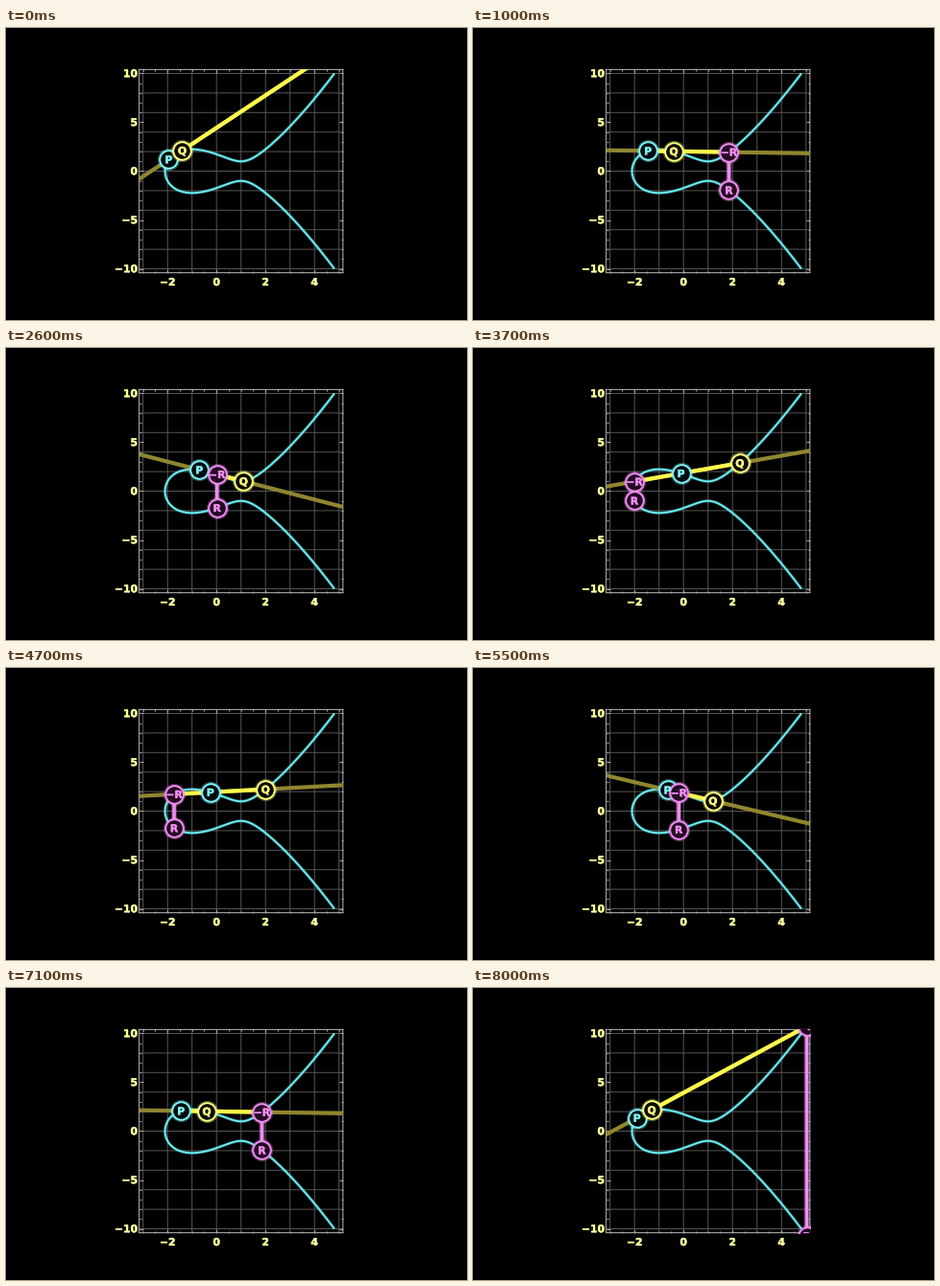
These frames come from a looping animation (480 px wide and 305 px high, 8.1 s). A matplotlib script:

```python
import numpy as np
import matplotlib.pyplot as plt
from matplotlib.animation import FuncAnimation
from matplotlib.patheffects import withStroke
from matplotlib.ticker import MultipleLocator

WIDTH, HEIGHT, DPI = 480, 305, 100
FRAMES, INTERVAL = 81, 100
PX = 72 / DPI                      # one pixel in points
UNIT_X, UNIT_Y = 25.5, 10.2        # pixels per data unit
LEFT, TOP, SIDE = 138.6, 43.4, 212.2

CYAN, YELLOW, PINK = "#6aeef3", "#fffa4c", "#ee8cee"
PALE_CYAN, PALE_YELLOW = "#7df3f7", "#ffff80"
OLIVE, LABEL, GRID, FRAME = "#8f8630", "#ffff9c", "#565656", "#a8a8a8"

plt.rcParams["path.snap"] = False
fig = plt.figure(figsize=(WIDTH / DPI, HEIGHT / DPI), dpi=DPI, facecolor="black")
ax = fig.add_axes([LEFT / WIDTH, 1 - (TOP + SIDE) / HEIGHT,
                   SIDE / WIDTH, SIDE / HEIGHT], facecolor="black")
ax.set_xlim(1 - 4.16, 1 + 4.16)
ax.set_ylim(-10.4, 10.4)


def height(x):
    """Upper branch of y^2 = x^3 - 3x + 3."""
    return np.sqrt(np.maximum(x**3 - 3 * x + 3, 0))


def heavy_text(color, size):
    return dict(color=color, family="DejaVu Sans", weight="bold",
                size=size * PX, va="baseline",
                path_effects=[withStroke(linewidth=0.4 * PX, foreground=color)])


def draw_frame():
    for x in range(-3, 6):
        ax.axvline(x, color=GRID, lw=PX, zorder=1)
    for y in range(-10, 11, 2):
        ax.axhline(y, color=GRID, lw=PX, zorder=1)
    for axis, major, minor in ((ax.xaxis, 2, 0.5), (ax.yaxis, 5, 1)):
        axis.set_major_locator(MultipleLocator(major))
        axis.set_minor_locator(MultipleLocator(minor))
    for which, length in (("major", 4), ("minor", 2.4)):
        ax.tick_params(which=which, direction="in", length=length * PX,
                       width=PX, color=FRAME, top=True, right=True,
                       labelbottom=False, labelleft=False)
    for spine in ax.spines.values():
        spine.set(color=FRAME, lw=1.1 * PX)

    style = heavy_text(LABEL, 10.8)

    def label(value, x, y, ha):
        text = str(value).replace("-", "\u2212")
        fig.text(x / WIDTH, 1 - y / HEIGHT, text, ha=ha, **style)

    for x in (-2, 0, 2, 4):
        label(x, LEFT + (x + 3.16) * UNIT_X, 269, "center")
    for y in (-10, -5, 0, 5, 10):
        label(y, 137, 153.2 - y * UNIT_Y, "right")


def stroke(color, width, z, glow=0):
    """A line with an optional soft halo, returned as a list of artists."""
    lines = [ax.plot([], [], color=color, lw=width * PX, zorder=z,
                     solid_capstyle="butt")[0]]
    if glow:
        lines += ax.plot([], [], color=color, lw=(width + glow) * PX, alpha=0.3,
                         zorder=z - 0.1, solid_capstyle="butt")
    return lines


def place(lines, xs, ys):
    for line in lines:
        line.set_data(xs, ys)


class Badge:
    def __init__(self, text, color, fill, z):
        halo = ax.plot([], [], "o", ms=19 * PX, mfc="none", mec=color,
                       mew=4.4 * PX, alpha=0.3, zorder=z)[0]
        ring = ax.plot([], [], "o", ms=18.6 * PX, mfc=fill, mec=color,
                       mew=2 * PX, zorder=z + 0.1)[0]
        self.marks = [halo, ring]
        # Letters stay readable where badges overlap.
        self.text = ax.text(0, 0, text, ha="center", zorder=12, clip_on=True,
                            **heavy_text(color, 10.8))

    def move(self, x, y):
        place(self.marks, [x], [y])
        self.text.set_position((x, y - 4 / UNIT_Y))


draw_frame()

# Squared spacing resolves the steep turn at the left root.
root = min(np.roots([1, 0, -3, 3]).real)
end = max(np.roots([1, 0, -3, -97]).real)
xs = root + (end - root) * np.linspace(0, 1, 300) ** 2
ys = height(xs)
place(stroke(CYAN, 1.9, 3, 1.6), np.r_[xs[::-1], xs], np.r_[ys[::-1], -ys])

full_line = stroke(OLIVE, 4.2, 4)
chord = stroke(YELLOW, 4.2, 5)
mirror = stroke(PINK, 3.6, 6, 2.4)
badge_p = Badge("P", PALE_CYAN, "#000a0c", 7)
badge_q = Badge("Q", PALE_YELLOW, "#0a0a00", 8)
badge_neg = Badge("\u2212R", PINK, "#240a24", 9)
badge_r = Badge("R", PINK, "#240a24", 10)


def progress(n):
    """Out and back at constant speed, with a slight lag on the way out."""
    return min(n, FRAMES - n) - np.exp(-((n - 26) / 4) ** 2)


def update(n):
    step = progress(n)
    px, qx = -1.95 + 0.05 * step, -1.4 + 0.1 * step
    py, qy = height(px), height(qx)
    slope = (qy - py) / (qx - px)
    rx = slope**2 - px - qx

    def on_line(x):
        return py + slope * (x - px)

    ry = on_line(rx)
    edges = np.array([-4.0, 6.0])
    span = np.array([min(px, qx, rx), max(px, qx, rx)])
    place(full_line, edges, on_line(edges))
    place(chord, span, on_line(span))
    place(mirror, [rx, rx], [ry, -ry])
    badge_p.move(px, py)
    badge_q.move(qx, qy)
    badge_neg.move(rx, ry)
    badge_r.move(rx, -ry)
    return []


anim = FuncAnimation(fig, update, frames=FRAMES, interval=INTERVAL,
                     repeat=True, repeat_delay=0, blit=False)
plt.show()
```
